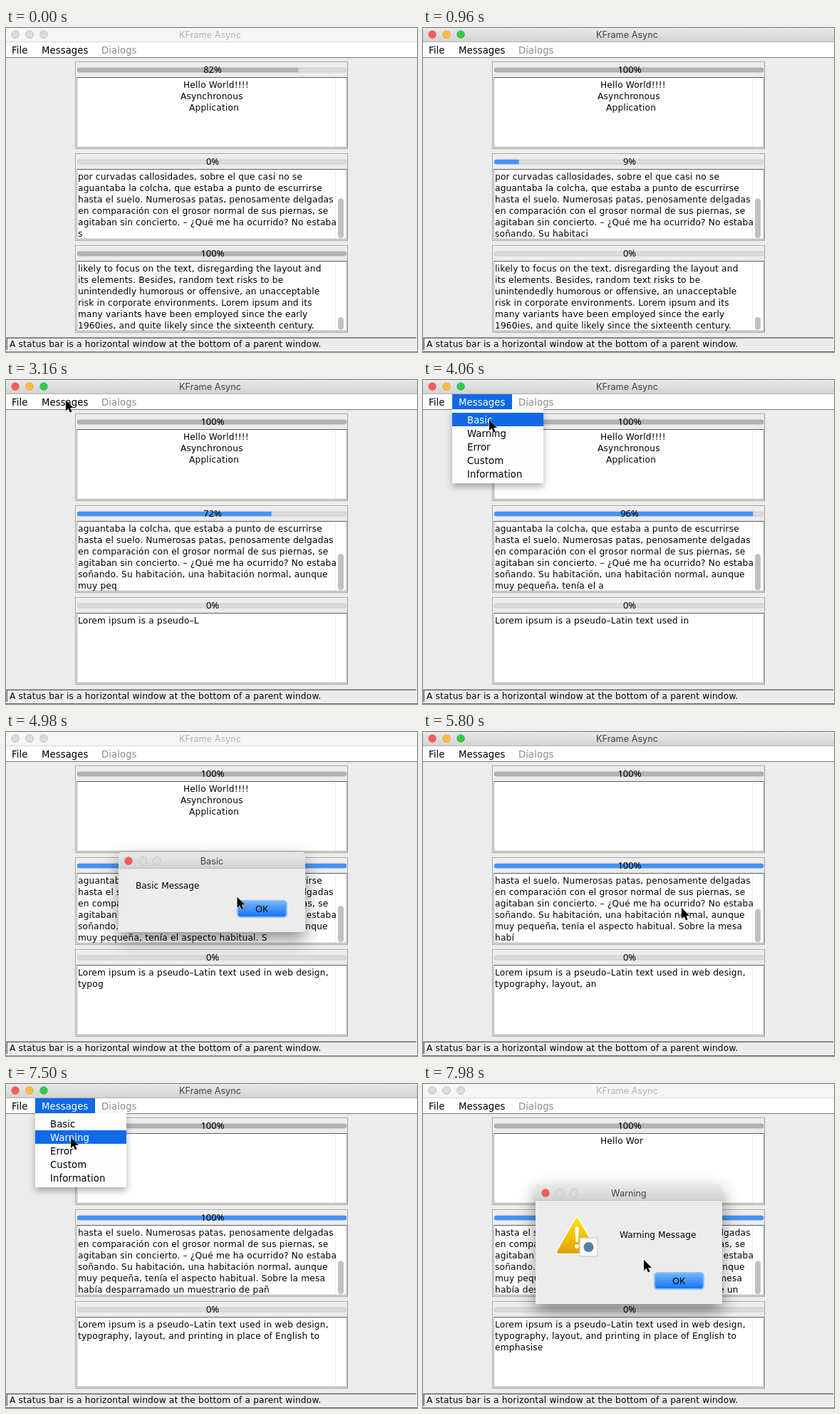
Write an HTML page that moves like this. It is 577 px wide and 455 px high and loops after 8 s.

```html
<!DOCTYPE html>
<html lang="en">
<head>
<meta charset="utf-8">
<title>Async panels</title>
<style>
html, body { margin: 0; width: 100%; height: 100%; overflow: hidden; background: #ececec; }
svg { display: block; width: 577px; height: 455px; }
text { font: 12.2px "DejaVu Sans", "Noto Sans", sans-serif; fill: #000; white-space: pre; }
.body { letter-spacing: .18px; }
.menu { font-size: 13.2px; letter-spacing: .1px; }
.title { font: 12.7px Inter, Roboto, sans-serif; text-anchor: middle; }
.mid { font: 13px "Noto Sans", "Open Sans", sans-serif; text-anchor: middle; }
.drop { filter: drop-shadow(0 5px 5px rgba(0,0,0,.3)); }
.float { filter: drop-shadow(0 10px 12px rgba(0,0,0,.45)); }
</style>
</head>
<body>
<svg id="stage" viewBox="0 0 577 455">
  <defs>
    <linearGradient id="chrome" x2="0" y2="1"><stop stop-color="#e9e9e9"/><stop offset="1" stop-color="#d2d2d2"/></linearGradient>
    <linearGradient id="press" x2="0" y2="1"><stop stop-color="#6fb5fb"/><stop offset="1" stop-color="#1674f6"/></linearGradient>
    <linearGradient id="amber" x2="0" y2="1"><stop stop-color="#ffe100"/><stop offset="1" stop-color="#e0a400"/></linearGradient>
  </defs>
</svg>
<script>
const LOOP = 8000;
const NS = 'http://www.w3.org/2000/svg';
const stage = document.getElementById('stage');

function add(tag, attrs, parent = stage, content = '') {
  const el = document.createElementNS(NS, tag);
  set(el, attrs);
  el.textContent = content;
  parent.appendChild(el);
  return el;
}
function set(el, attrs) {
  for (const key in attrs) el.setAttribute(key, attrs[key]);
}
const rect = (x, y, width, height, fill, parent, more) =>
  add('rect', { x, y, width, height, fill, ...more }, parent);
const frame = (x, y, w, h, stroke, parent) =>
  rect(x + .5, y + .5, w, h, 'none', parent, { stroke });
const label = (x, y, content, cls, parent) =>
  add('text', { x, y, class: cls }, parent, content);
const show = (el, on) => { el.style.display = on ? '' : 'none'; };

const LIGHTS = ['#fc5b57', '#fdbc40', '#34c84a'];
const lights = (x, y, parent) => LIGHTS.map((fill, i) =>
  add('circle', { cx: x + 20 * i, cy: y, r: 5.5, fill }, parent));
function tint(dots, colors) {
  dots.forEach((dot, i) => set(dot, {
    fill: colors[i] || '#dcdcdc',
    stroke: colors[i] ? 'rgba(0,0,0,.12)' : '#c6c6c6'
  }));
}

// Copy

const GREETING = ['Hello World!!!!', 'Asynchronous', 'Application'];
const STORY = [
  'por curvadas callosidades, sobre el que casi no se',
  'aguantaba la colcha, que estaba a punto de escurrirse',
  'hasta el suelo. Numerosas patas, penosamente delgadas',
  'en comparación con el grosor normal de sus piernas, se',
  'agitaban sin concierto. – ¿Qué me ha ocurrido? No estaba'
];
const STORY_TYPED = [
  'soñando. Su habitación, una habitación normal, aunque ',
  'muy pequeña, tenía el aspecto habitual. Sobre la mesa ',
  'había desparramado un muestrario de paños sobre un'
];
const ESSAY = [
  'likely to focus on the text, disregarding the layout and',
  'its elements. Besides, random text risks to be',
  'unintendedly humorous or offensive, an unacceptable',
  'risk in corporate environments. Lorem ipsum and its',
  'many variants have been employed since the early',
  '1960ies, and quite likely since the sixteenth century.'
];
const ESSAY_TYPED = [
  'Lorem ipsum is a pseudo–Latin text used in web design, ',
  'typography, layout, and printing in place of English to ',
  'emphasise'
];

// Main window

const titleBar = rect(0, 0, 577, 20, 'url(#chrome)');
const titleEdge = rect(0, 19, 577, 1, '#b4b4b4');
const dots = lights(13, 9);
const caption = label(286.5, 14, 'KFrame Async', 'title');
rect(0, 20, 577, 21, '#fff');
rect(0, 41, 577, 1, '#7d7d7d');
const menuTab = rect(41, 20, 84, 21, '#1169e8');
label(8, 36, 'File', 'menu');
const menuName = label(50, 36, 'Messages', 'menu');
label(134, 36, 'Dialogs', 'menu').style.fill = '#8c8c8c';

function makePanel(top, xs) {
  frame(98, top + 1, 381, 121, '#fafafa');
  frame(97, top, 382, 122, '#a2a2a2');
  const bar = (fill, stroke) =>
    rect(100, top + 9, 378, 6, fill, stage, { rx: 3, stroke, 'stroke-width': .8 });
  bar('#dcdcdc', '#c4c4c4');
  const fill = bar('#b3b3b3', '#a2a2a2');
  const pct = label(290, top + 16, '', 'mid');
  rect(99, top + 22, 380, 99, '#fff');
  frame(99, top + 22, 379, 98, '#a0a0a0');
  rect(99, top + 22, 380, 1, '#606060');
  rect(462, top + 23, 1, 97, '#ededed');
  const thumb = rect(466, 0, 8, 0, '#c1c1c1', stage, { rx: 4 });
  const rows = Array.from({ length: 6 }, (_, i) =>
    label(xs[i] || 101, top + 37 + 16 * i, '', 'body'));
  return { top, fill, pct, thumb, rows };
}
const panels = [
  makePanel(47, [249, 245, 257]),
  makePanel(176, []),
  makePanel(305, [])
];

const GRAY = ['#b3b3b3', '#a2a2a2'];
const BLUE = ['#4296f8', '#3a8cf0'];

function drawPanel(p, value, [fill, stroke], lines, total) {
  show(p.fill, value > 0);
  set(p.fill, { fill, stroke });
  p.fill.style.clipPath = `inset(0 ${378 - 3.78 * value}px 0 0)`;
  p.pct.textContent = Math.round(value) + '%';
  p.rows.forEach((row, i) => { row.textContent = lines[i] || ''; });
  const h = total > 6 ? 558 / total : 0;
  set(p.thumb, { y: p.top + 119 - h, height: h });
}

// Lowered bevel around the status line
rect(0, 434, 577, 1, '#a5a5a5');
rect(0, 434, 1, 18, '#a5a5a5');
rect(1, 435, 575, 1, '#6c6c6c');
rect(1, 435, 1, 17, '#6c6c6c');
rect(0, 452, 577, 2, '#fafafa');
rect(576, 434, 1, 19, '#fafafa');
const bottomEdge = rect(0, 454, 577, 1, '#667788');
label(5, 448, 'A status bar is a horizontal window at the bottom of a parent window.', 'body');

// Menu

const ITEMS = ['Basic', 'Warning', 'Error', 'Custom', 'Information'];
const menu = add('g', { class: 'drop' });
rect(41, 41, 128, 104, '#fefefe', menu);
const hover = rect(41, 46, 128, 19, '#1169e8', menu);
const items = ITEMS.map((name, i) => label(62, 61 + 19 * i, name, 'menu', menu));

// Dialogs

function makeDialog(name, message, top, height, textX, textY) {
  const g = add('g', { class: 'float' });
  rect(158, top, 262, height, '#ececec', g, { rx: 5 });
  rect(158, top + height - 10, 262, 10, '#ececec', g);
  add('path', { d: `M158 ${top + 23}v-18q0-5 5-5h252q5 0 5 5v18z`, fill: 'url(#chrome)' }, g);
  rect(158, top + 22, 262, 1, '#bdbdbd', g);
  tint(lights(172, top + 12, g), [LIGHTS[0]]);
  label(289, top + 17, name, 'title', g).style.fill = '#444';
  label(textX, textY, message, '', g);
  const y = top + height - 43;
  rect(324, y - 2, 71, 25, '#8fc0f5', g, { rx: 5.5 });
  rect(326, y, 67, 21, 'url(#press)', g, { rx: 3.5 });
  label(359, y + 15, 'OK', 'mid', g);
  return g;
}
const basic = makeDialog('Basic', 'Basic Message', 169, 112, 182, 220);
const warning = makeDialog('Warning', 'Warning Message', 141, 168, 276, 216);
const triangle = (stroke, width) => add('path', {
  d: 'M216 190L190 236H242Z', fill: 'url(#amber)', stroke,
  'stroke-width': width, 'stroke-linejoin': 'round'
}, warning);
triangle('#fff', 7);
triangle('url(#amber)', 4);
add('path', { d: 'M213 202q3-4 6 0l-1.5 20h-3z', fill: '#fff' }, warning);
add('circle', { cx: 216, cy: 228, r: 3, fill: '#fff' }, warning);
rect(220, 216, 25, 26, '#f7f8fa', warning, { stroke: '#c3c9d2' });
add('circle', { cx: 232.5, cy: 229, r: 7, fill: '#5382a1' }, warning);

const pointer = add('path', {
  d: 'M0 0V15l3.5-3.2 2.5 5.6 2.6-1.1-2.5-5.4H11z',
  fill: '#000', stroke: '#fff', 'stroke-width': 1, 'paint-order': 'stroke'
});

// Timing

const smooth = k => k * k * (3 - 2 * k);

// Points are [time, ...values].
function along(points, t, ease = k => k) {
  if (t <= points[0][0]) return points[0].slice(1);
  for (let i = 1; i < points.length; i++) {
    const a = points[i - 1], b = points[i];
    if (t <= b[0]) {
      const k = ease((t - a[0]) / (b[0] - a[0]));
      return a.slice(1).map((v, j) => v + (b[j + 1] - v) * k);
    }
  }
  return points[points.length - 1].slice(1);
}

const PATH = [
  [2380, 240, 112], [2500, 226, 92], [2620, 226, 92], [3130, 84, 28], [3350, 82, 32],
  [3700, 90, 55], [4060, 93, 56], [4250, 90, 54], [5000, 325, 232], [5350, 363, 247],
  [5850, 363, 247], [6500, 84, 28], [6680, 82, 28], [6790, 81, 43], [7150, 90, 75],
  [7500, 91, 75], [7900, 310, 247]
];
const STORY_KEYS = [[0, 1], [960, 20], [2560, 50], [4060, 77], [5800, 112], [6790, 132], [7980, 158]];
const ESSAY_KEYS = [[1810, 0], [2560, 14], [4060, 42], [5800, 77], [6790, 96], [7980, 120]];
const BAR_KEYS = [[640, 0], [960, 9], [2560, 56], [4060, 96], [4200, 100]];

function typed(lines, n) {
  const out = [];
  for (const line of lines) {
    if (n <= 0) break;
    out.push(line.slice(0, n));
    n -= line.length;
  }
  return out;
}
const count = (keys, t) => Math.floor(along(keys, t)[0] + .2);

function popDialog(g, t, from, to) {
  const on = t >= from && t < to;
  show(g, on);
  if (!on) return;
  const k = Math.min(1, (t - from) / 140);
  const s = .8 + .2 * smooth(k);
  set(g, { transform: `translate(289 225) scale(${s}) translate(-289 -225)`, opacity: .3 + .7 * k });
}

function draw(t) {
  const active = (t >= 720 && t < 4160) || (t >= 5740 && t < 7530);
  set(titleBar, { fill: active ? 'url(#chrome)' : '#f6f6f6' });
  set(titleEdge, { fill: active ? '#b4b4b4' : '#d8d8d8' });
  set(bottomEdge, { fill: active ? '#566574' : '#7d8b98' });
  caption.style.fill = active ? '#424242' : '#b2b2b2';
  tint(dots, active ? LIGHTS : []);

  const greeting = t < 5670 ? GREETING
    : [GREETING[0].slice(0, Math.max(0, Math.floor((t - 5670) / 51) - 36))];
  drawPanel(panels[0], Math.min(100, 82 + t * .0281), GRAY, greeting, 3);

  const story = STORY.concat(typed(STORY_TYPED, count(STORY_KEYS, t)));
  drawPanel(panels[1], along(BAR_KEYS, t)[0], t < 720 ? GRAY : BLUE,
    story.slice(-6), story.length + 4);

  const fresh = t >= 1810;
  drawPanel(panels[2], t < 640 ? 100 : 0, GRAY,
    fresh ? typed(ESSAY_TYPED, count(ESSAY_KEYS, t)) : ESSAY, fresh ? 0 : 31);

  const [x, y] = along(PATH, t, smooth);
  show(pointer, t >= 2380);
  set(pointer, { transform: `translate(${x} ${y})` });

  const open = (t >= 3180 && t < 4140) || (t >= 6560 && t < 7510);
  const picked = Math.floor((y - 46) / 19);
  show(menu, open);
  show(menuTab, open);
  menuName.style.fill = open ? '#fff' : '#000';
  show(hover, picked >= 0);
  set(hover, { y: 46 + 19 * picked });
  items.forEach((item, i) => { item.style.fill = i === picked ? '#fff' : '#000'; });

  popDialog(basic, t, 4330, 5690);
  popDialog(warning, t, 7620, LOOP);
}

const start = performance.now();
function tick() {
  draw((performance.now() - start) % LOOP);
  requestAnimationFrame(tick);
}
tick();
</script>
</body>
</html>
```
